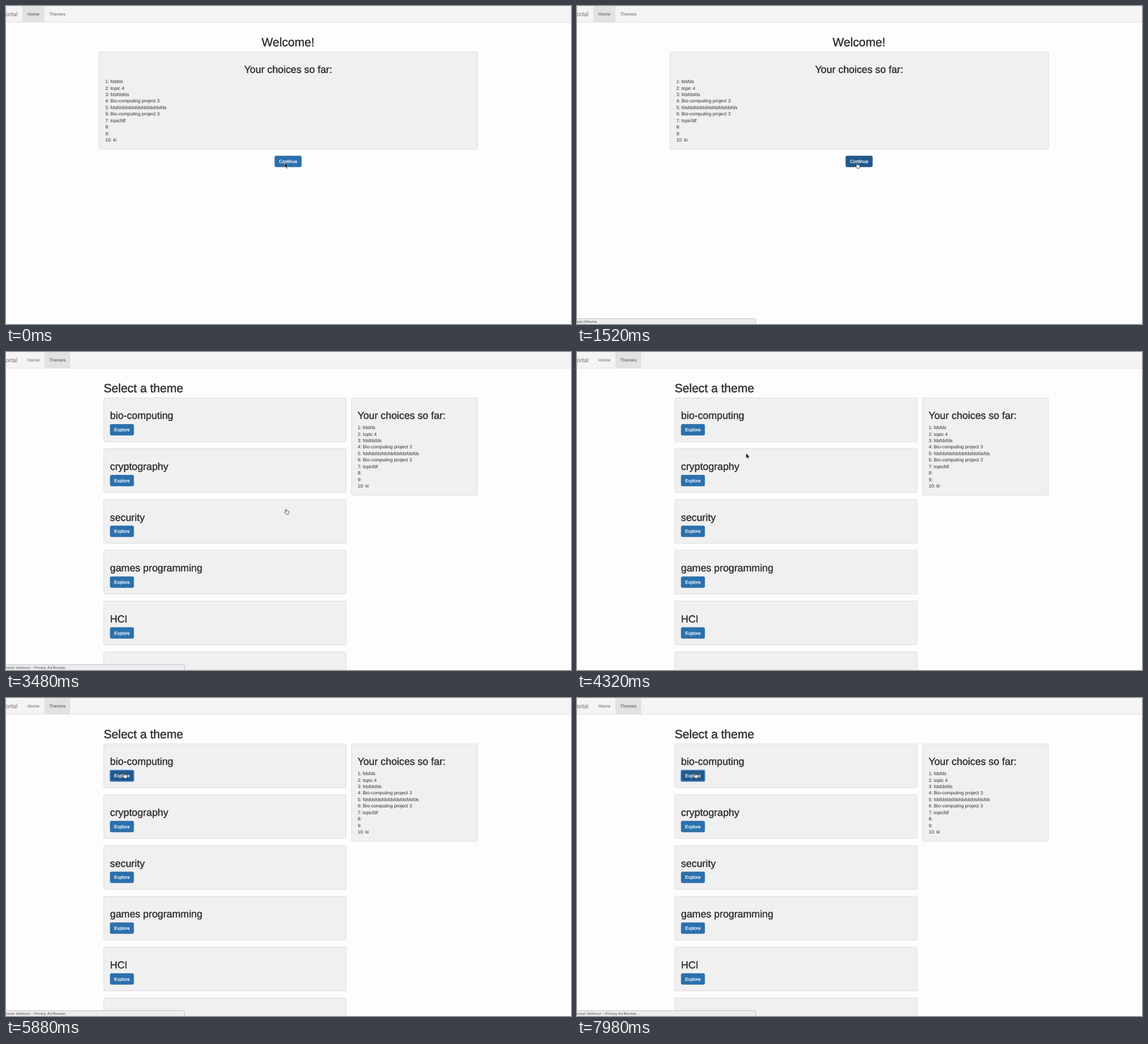
Animation, 998 px wide and 561 px high, one loop 8000 ms. Source, as an HTML page:

```html
<!DOCTYPE html>
<html lang="en">
<head>
<meta charset="utf-8">
<title>Theme selection</title>
<style>
  html, body { margin: 0; width: 100%; height: 100%; overflow: hidden; background: #fdfdfd; }
  svg { display: block; width: 998px; height: 561px; }
  text { font: 8.25px "Liberation Sans", Arial, sans-serif; fill: #2e2e2e; text-rendering: geometricPrecision; white-space: pre; }
  .h1, .h2 { stroke: #2e2e2e; stroke-width: .45px; }
  .h1 { font-size: 21.1px; }
  .h2 { font-size: 17.8px; }
  .nav { font-size: 8.05px; fill: #666; }
  .nav.on { fill: #505050; }
  .brand { font-size: 10.5px; fill: #707070; }
  .label { font-size: 8.1px; fill: #fff; stroke: #fff; stroke-width: .22px; }
  .status { font: 6.2px Inter, sans-serif; fill: #444; }
  .panel { fill: #f0f0f0; stroke: #dcdce3; }
  .button { fill: #2b70ad; stroke: #2867a0; stroke-width: .6px; }
  .hover .button { fill: #23598b; stroke: #1d4c78; }
  .active .button { fill: #1c4568; stroke: #153652; }
  .ring { fill: none; stroke: #62a3ea; stroke-width: 1.4px; visibility: hidden; }
  .focus .ring { visibility: visible; }
</style>
</head>
<body>
<svg id="stage" viewBox="0 0 998 561"></svg>
<script>
const LOOP = 8000;
const PITCH = 89.6;
const themes = ["bio-computing", "cryptography", "security", "games programming", "HCI", ""];
const choices = ["fdsfds", "topic 4", "fdsfdsfds", "Bio-computing project 3", "fds".repeat(9),
  "Bio-computing project 3", "topicfdf", "", "", "ki"];

// Each row: start time in ms, value held until the next row
const pageSteps = [[0, "home"], [3140, "themes"]];
const continueSteps = [[0, ""], [820, "hover"], [2200, "hover active focus"], [2340, "hover focus"]];
const exploreSteps = [[0, ""], [4680, "hover"], [5100, "hover active focus"], [5320, "hover focus"]];
const cursorSteps = [[0, "arrow"], [820, "hand"], [3640, "arrow"], [4680, "hand"]];
const waiting = "nsion Veilmoor – Privacy Ad Blocker...";
const statusSteps = [[0, ""], [920, "oject/theme"], [2360, "est..."], [3060, waiting], [3720, ""],
  [4760, "oject/theme/bio-computing"], [5360, "est..."], [5640, waiting]];
const move = { start: 3700, end: 4700, from: [492.3, 276.6], to: [206.6, 132] };

const text = (x, y, str, cls = "", anchor = "start") =>
  `<text x="${x}" y="${y}" class="${cls}" text-anchor="${anchor}">${str}</text>`;

const panel = (x, y, w, h) =>
  `<rect class="panel" x="${x}" y="${y}" width="${w}" height="${h}" rx="2.3"/>`;

const button = (x, y, w, str, id = "") =>
  `<g${id && ` id="${id}"`}>
    <rect class="button" x="${x}" y="${y}" width="${w}" height="19.4" rx="2.3"/>
    <rect class="ring" x="${x - .4}" y="${y - .4}" width="${w + .8}" height="20.2" rx="2.3"/>
    ${text(x + w / 2, y + 12.6, str, "label", "middle")}
  </g>`;

const choiceList = x => choices.map((c, i) => text(x, 136.1 + i * 11.43, `${i + 1}: ${c}`)).join("");

const navBar = (x, w, active) =>
  `<rect width="998" height="28.5" fill="#f4f4f4"/>
  <rect x="${x}" width="${w}" height="28.5" fill="#e2e2e2"/>
  <rect y="28.2" width="998" height="1" fill="#dfdfe6"/>
  ${text(-.2, 18, "ortal", "brand")}
  ${text(37.8, 17.3, "Home", active === "Home" ? "nav on" : "nav")}
  ${text(76.2, 17.3, "Themes", active === "Themes" ? "nav on" : "nav")}`;

const themeBox = (name, i) => {
  const y = 81 + i * PITCH;
  return panel(172.8, y, 428, 77.2) + (name &&
    text(183.8, y + 37.4, name, "h2") + button(184, y + 46.5, 41.6, "Explore", i ? "" : "explore"));
};

const stage = document.getElementById("stage");
stage.innerHTML = `
  <g id="home">
    ${navBar(28.8, 39, "Home")}
    ${text(498.2, 70.8, "Welcome!", "h1", "middle")}
    ${panel(164, 81, 669, 171.5)}
    ${text(498.4, 118.4, "Your choices so far:", "h2", "middle")}
    ${choiceList(175.4)}
    ${button(474.8, 264.5, 47.1, "Continue", "continue")}
  </g>
  <g id="themes">
    ${navBar(67.8, 45.6, "Themes")}
    ${text(172.4, 70.8, "Select a theme", "h1")}
    ${themes.map(themeBox).join("")}
    ${panel(610.3, 81, 222.5, 171.5)}
    ${text(621, 118.4, "Your choices so far:", "h2")}
    ${choiceList(621.2)}
  </g>
  <g id="status">
    <path d="M-1 551.6H313.4Q315.5 551.6 315.5 553.7V562H-1Z" fill="#ededf0" stroke="#b9b9c4" stroke-width=".9"/>
    ${text(-.2, 558.6, "", "status")}
  </g>
  <g id="cursor" stroke-linejoin="round">
    <path id="arrow" d="M0 0V9.2L2.2 7.2 3.7 10.5 5.2 9.8 3.7 6.6H6.7Z" fill="#111" stroke="#fff" stroke-width=".6"/>
    <path id="hand" d="M1.6 5.6V1.2Q2.3 -.2 3.1 1.2V3.6Q4.2 2.9 4.8 3.9 5.7 3.3 6.2 4.3 7.2 3.9 7.4 5V7.2L6.4 9.7H2.5L.2 6.4Q-.5 5 .6 5Z"
      fill="#fff" stroke="#222" stroke-width=".8"/>
  </g>`;

const $ = id => document.getElementById(id);
const statusText = document.querySelector("text.status");
const at = (steps, t) => steps.findLast(([start]) => start <= t)[1];
const show = (id, visible) => $(id).setAttribute("display", visible ? "inline" : "none");
const ease = p => p * p * (3 - 2 * p);

function render(t) {
  const page = at(pageSteps, t);
  show("home", page === "home");
  show("themes", page === "themes");
  $("continue").setAttribute("class", at(continueSteps, t));
  $("explore").setAttribute("class", at(exploreSteps, t));

  const message = at(statusSteps, t);
  show("status", message !== "");
  statusText.textContent = message;

  const cursor = at(cursorSteps, t);
  show("arrow", cursor === "arrow");
  show("hand", cursor === "hand");
  const p = ease(Math.min(1, Math.max(0, (t - move.start) / (move.end - move.start))));
  const [x, y] = move.from.map((v, i) => v + (move.to[i] - v) * p);
  $("cursor").setAttribute("transform", `translate(${x} ${y})`);
}

const origin = performance.now();
function tick() {
  render((performance.now() - origin) % LOOP);
  requestAnimationFrame(tick);
}
tick();
</script>
</body>
</html>
```
